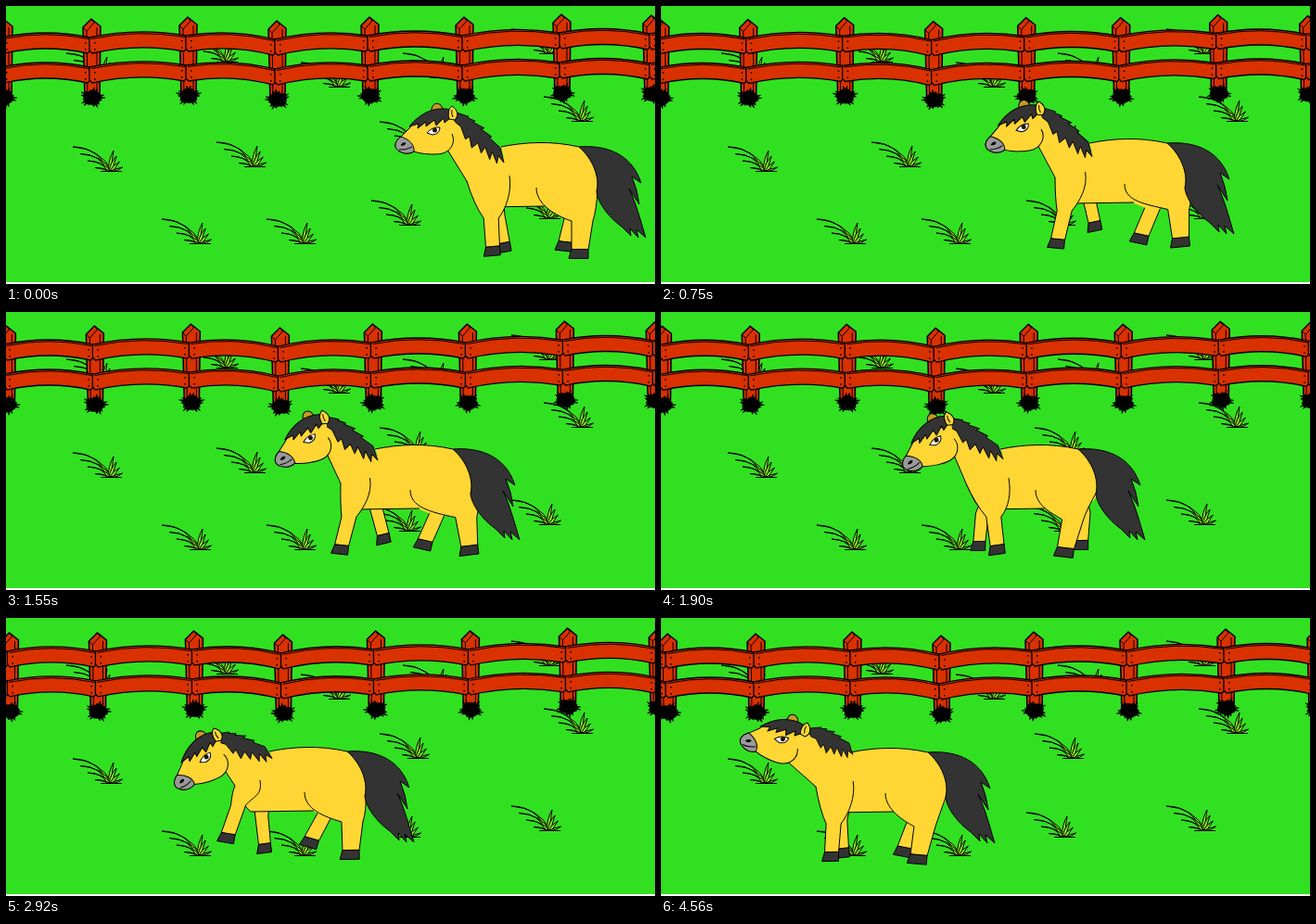
Animation of 700 by 300 pixels, one loop 4650 ms. Source, as an HTML page with a canvas:

```html
<!DOCTYPE html>
<html lang="en">
<head>
<meta charset="utf-8">
<title>Walking horse</title>
<style>
html, body { margin: 0; width: 100%; height: 100%; overflow: hidden; background: #fff; }
canvas { display: block; width: 700px; height: 300px; }
</style>
</head>
<body>
<canvas id="stage" width="700" height="300"></canvas>
<script>
const ctx = document.getElementById('stage').getContext('2d');
const LOOP = 4650, LAST = 59;
const GREEN = '#32e022', YELLOW = '#ffd633', DARK = '#333', RED = '#d93100';

const mix = (a, b, u) => a + (b - a) * u;
const clamp = u => Math.min(1, Math.max(0, u));
const smooth = u => u * u * (3 - 2 * u);

function shape(d, fill, stroke = '#000', width = 1) {
  const p = new Path2D(d);
  if (fill) { ctx.fillStyle = fill; ctx.fill(p); }
  if (stroke) { ctx.strokeStyle = stroke; ctx.lineWidth = width; ctx.stroke(p); }
}

function at(x, y, draw, angle = 0, sx = 1, sy = 1) {
  ctx.save();
  ctx.translate(x, y);
  ctx.rotate(angle);
  ctx.scale(sx, sy);
  draw();
  ctx.restore();
}

// ---- Grass ----
const tufts = [[65,50], [197,33], [428,50], [318,60], [545,24], [72,151], [227,146],
  [168,229], [281,229], [394,209], [403,124], [545,202], [580,97]];

function blade(tx, ty, cx, cy, base) {
  shape(`M${base - 2},27Q${cx - 1},${cy} ${tx},${ty}Q${cx + 2},${cy + 2} ${base + 2},27Z`, '#86e81c');
}

function tuft() {
  for (let i = 0; i < 4; i++) {
    const x = 8 * i, y = 1 + 7.5 * i;
    blade(x, y, mix(x, 40, .7), y, 40 - i / 2);
    blade(44 + 3.2 * i, 5 + 6 * i, 40 + 2 * i, 13 + 4 * i, 40 + i);
  }
  shape('M30,27.5H53', null);
}

// ---- Fence: peak of each post ----
const posts = [[-105,13], [-2,14], [93,14], [197,12], [293,16], [393,12], [495,12], [600,9], [697,10], [800,9]];

function post(x, y) {
  at(x, y, () => {
    shape('M-10,9L-1,0 9,8 8,88 -8,88Z', RED, '#000', 1.5);
    shape('M-10,9L-6,13 2,4 -1,0M-6,13L-5,86M5,9V82', null);
  });
}

function rail([x0, y0], [x1, y1], drop) {
  const l = x0 - 3, r = x1 - 3, a = y0 + drop, b = y1 + drop;
  const m = (l + r) / 2, c = (a + b) / 2 - 10;
  shape(`M${l},${a}Q${m},${c} ${r},${b}L${r + 1},${b + 14} ${r - 2},${b + 17}` +
    `Q${m},${c + 17} ${l + 3},${a + 17}L${l},${a + 14}Z`, RED, '#000', 1.3);
  shape(`M${l + 2},${a + 1.5}Q${m},${c + 2} ${r - 1},${b + 1.5}`, null);
  ctx.fillStyle = '#000';
  for (const x of [l + 5, r - 5])
    for (const y of [5, 12]) ctx.fillRect(x, (x < m ? a : b) + y, 1.5, 1.5);
}

function bush(x, y, seed) {
  let d = '';
  for (let i = 0; i < 44; i++) {
    const a = i * Math.PI / 22, r = i % 2 ? .7 : .9 + .2 * Math.sin(i * 7 + seed);
    d += `${i ? 'L' : 'M'}${x + Math.cos(a) * 13 * r},${y + Math.sin(a) * 10.5 * r}`;
  }
  shape(d + 'Z', '#000', '#000', .6);
}

function fence() {
  posts.forEach(p => post(...p));
  for (let i = 1; i < posts.length; i++)
    for (const drop of [20, 52]) rail(posts[i - 1], posts[i], drop);
  posts.forEach(([x, y], i) => bush(x, y + 85, i));
}

// ---- Horse, measured from the root of the tail ----
// Step, tail root x, y, ear height, head angle
const keys = [
  [0, 618, 152, -44, 0], [10, 546, 148, -45, -5], [25, 450, 148, -40, -16.5],
  [38, 368, 144, -25, -21], [47, 296, 145, -31, 18], [56, 288, 145, -32, 21], [60, 288, 145, -32, 21]
];

function pose(k) {
  const i = keys.findIndex(key => key[0] > k), a = keys[i - 1], b = keys[i];
  return a.map((v, j) => mix(v, b[j], (k - a[0]) / (b[0] - a[0])));
}

const FORE = { hip: -98, reach: 40, lift: 26 }, HIND = { hip: 8, reach: 29, lift: 8 };
const CYCLE = 10.3, STANCE = .7, TRAVEL = 47;

// The foot slides back with the ground, then swings forward; diagonal legs share a landing step
function joints(k, { hip, reach, lift }, rest, floor, landing) {
  const walk = smooth(clamp(k / 5)) * smooth(clamp((47 - k) / 5));
  const phase = ((k - landing) / CYCLE + 9) % 1;
  const swing = clamp((phase - STANCE) / (1 - STANCE));
  const back = TRAVEL * (swing ? 1 - smooth(swing) : phase / STANCE);
  const ax = mix(rest - 11 * clamp(k / 47), rest - reach + back, walk);
  const ay = floor - walk * (4 + lift * Math.sin(Math.PI * swing));
  return [mix(ax, hip, .36), ay - 31, ax, ay];
}

// "from" and "to" are path pieces joining the leg's front and back edges to the body
function leg([kx, ky, ax, ay], kneeW, ankleW, from, to) {
  let dx = (ax - kx) * .65, dy = ay - ky;
  const len = Math.hypot(dx, dy);
  dx /= len; dy /= len;
  const p = (side, down) => `${ax + dy * side + dx * down},${ay - dx * side + dy * down}`;
  const w = ankleW / 2, front = kx - kneeW / 2, back = kx + kneeW / 2;
  shape(`${from(front, ky)}L${p(-w, 0)} ${p(w, 0)} ${back},${ky}${to(back, ky)}`, YELLOW);
  shape(`M${p(-w, 0)}L${p(w, -1)} ${p(w + .5, 9)} ${p(-w - 2.5, 10)}Z`, DARK);
}

function farLeg(bones, hip, kneeW, ankleW) {
  leg(bones, kneeW, ankleW, (x, y) => `M${hip - 10},48L${x},${y}`, () => `L${hip + 10},48`);
}

const MANE = 'M0,0L16,-9 16,-7 25,-11 24,-8 38,-13 36,-9 51,-12 50,-9 67,-10 82,0 72,-1 77,7 64,1 ' +
  '68,10 54,3 56,12 45,6 44,16 33,8 32,14 18,7 10,8 0,4Z';
const TAIL = 'M0,0C24,-2 56,4 67,39L57,32Q63,46 65,62L54,45C62,62 66,78 72,98L62,89 64,98 55,88 ' +
  '56,96 46,86C32,76 20,60 19,48C23,32 14,12 0,0Z';

function head() {
  shape('M-22,5C-22,-2 -17,-5 -12,-1L-8,6Z', '#c59a20');
  shape('M2,12L-2,5 -20,6C-32,8 -40,16 -46,24L-55,33C-62,38 -63,44 -58,48C-52,52 -46,52 -41,49' +
    'C-32,52 -18,53 -10,51C0,48 4,38 0,30', YELLOW);
  shape('M-55,33C-62,38 -63,44 -58,48C-52,52 -46,52 -41,49C-40,42 -46,36 -55,33Z', '#999');
  shape('M-57,47Q-50,48 -43,44', null);
  shape('M-55,42Q-53,39 -50,40Q-51,43 -55,42Z', '#000');
  shape('M-27,29Q-21,22 -13,23Q-13,30 -21,31Z', '#fff');
  shape('M-21,26a2.5,2.5 0 1 0 5,0a2.5,2.5 0 1 0 -5,0Z', '#221500', null);
  shape('M-1,4C-18,0 -34,7 -46,22L-36,19 -37,24 -28,17 -28,22 -19,15 -17,21 -9,13 -8,18 -2,13Z', DARK);
  shape('M-3,14C-5,7 -3,2 0,0C6,4 8,10 3,15Z', YELLOW);
  shape('M0,4Q-1,8 1,12', null);
}

function horse(k) {
  const [, x, y, earY, deg] = pose(k);
  const earX = -137 + deg / 3, rot = deg * Math.PI / 180;
  const sin = Math.sin(rot), cos = Math.cos(rot);
  const jaw = `${earX - 5 * cos - 47 * sin},${earY - 5 * sin + 47 * cos}`;
  const tip = 17 - k / 4;
  const nearFore = joints(k, FORE, -93, 108, 7.7);
  const shoulder = -75 + .85 * Math.min(0, nearFore[0] + 95);

  at(x, y, () => {
    farLeg(joints(k, FORE, -81, 104, 12.5), -92, 14, 13);
    farLeg(joints(k, HIND, -14, 103, 7.7), -2, 17, 16);

    const back = 'C-30,-7 -60,-5 -84,0';
    shape(`M${earX},${earY + 6}L${jaw} -121,37C-116,46 -113,58 -104,65L-38,64 -14,74 8,62` +
      `C17,56 23,50 21,44C24,30 14,14 0,0${back}L-81,${tip - 5}Z`, YELLOW, null);
    shape(`M${jaw}L-121,37C-116,46 -113,58 -104,65L-36,64M0,0${back}`, null);

    leg(joints(k, HIND, 1, 111, 12.5), 23, 18,
      (fx, fy) => `M-46,44C-46,62 -26,${fy - 6} ${fx},${fy}`,
      (bx, by) => `Q${bx + 4},${by - 12} 20,46`);
    leg(nearFore, 16, 15,
      (fx, fy) => `M-121,37Q${(fx - 123) / 2},${fy - 14} ${fx},${fy}`,
      (bx, by) => `C${bx + 8},${by - 10} ${shoulder + 3},48 ${shoulder},31`);

    shape(TAIL, DARK);
    const mx = -83 - earX, my = tip - earY - 6;
    at(earX + 2, earY + 6, () => shape(MANE, DARK), Math.atan2(my, mx), Math.hypot(mx, my) / 82, .85);
    at(earX, earY, head, rot);
  });
}

// ---- Playback: four steps share 310 ms, one short and three long ----
function stepAt(t) {
  const r = t % 310;
  return Math.floor(t / 310) * 4 + (r < 40 ? 0 : 1 + Math.floor((r - 40) / 90));
}

function draw(k) {
  ctx.fillStyle = '#fff';
  ctx.fillRect(0, 298, 700, 2);
  ctx.save();
  ctx.beginPath();
  ctx.rect(0, 0, 700, 298);
  ctx.clip();
  ctx.fillStyle = GREEN;
  ctx.fillRect(0, 0, 700, 298);
  tufts.forEach(([x, y]) => at(x, y, tuft));
  at(10 * k / LAST, 3 * k / LAST, fence);
  horse(k);
  ctx.restore();
}

let shown = -1;
function tick() {
  const k = stepAt(performance.now() % LOOP);
  if (k !== shown) draw(shown = k);
  requestAnimationFrame(tick);
}

ctx.lineJoin = 'round';
tick();
</script>
</body>
</html>
```
